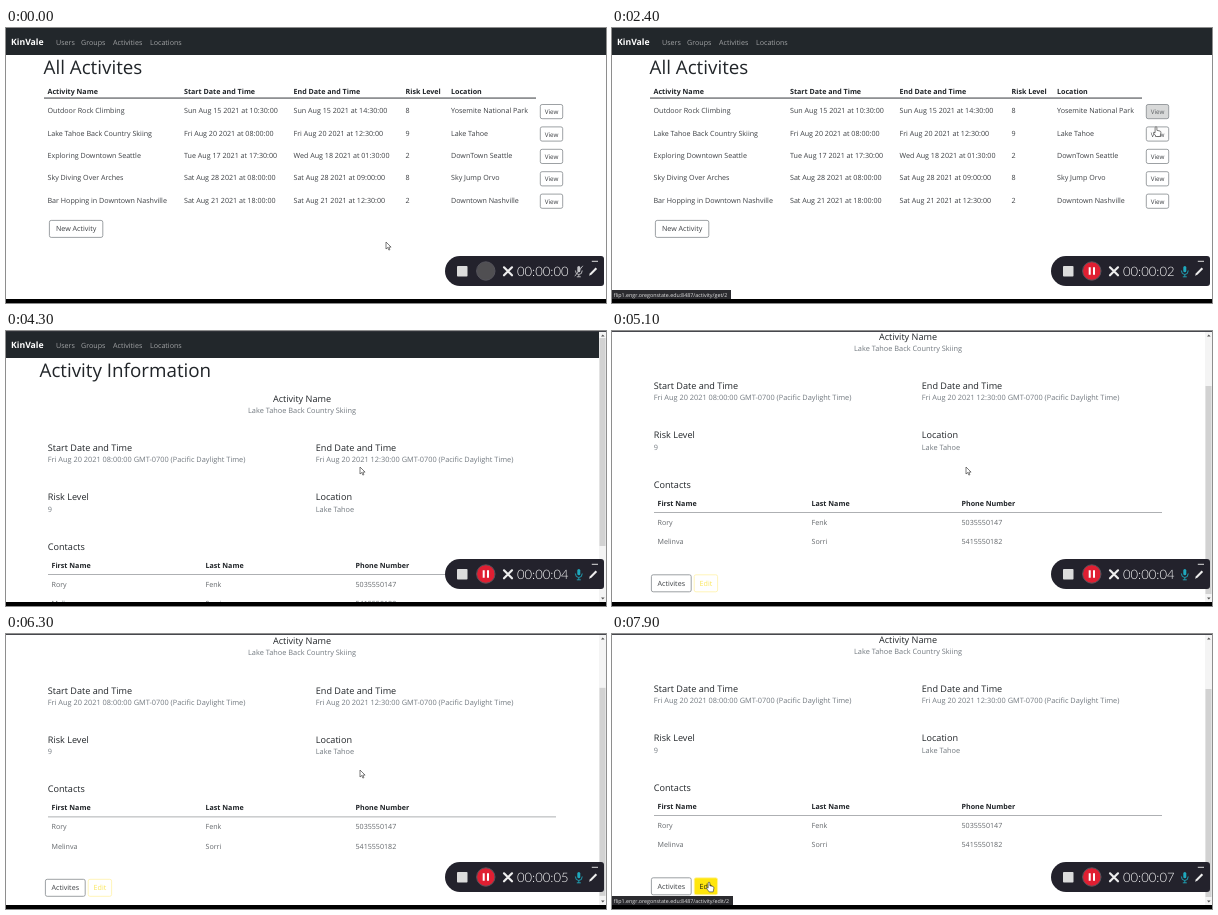
These frames come from a looping animation (600x275 px, 8 s). An HTML page:

```html
<!DOCTYPE html>
<html lang="en">
<head>
<meta charset="utf-8">
<title>Activities demo</title>
<style>
  html, body { margin: 0; width: 100%; height: 100%; overflow: hidden; background: #fff; }
  svg { display: block; width: 100vw; height: 100vh; }
  text { font: 7.13px "Open Sans", "Noto Sans", sans-serif; fill: #3c3f43; text-rendering: geometricPrecision; }
  .h1 { font-size: 18.8px; fill: #212529; }
  .brand { font-size: 8.7px; font-weight: 700; fill: #fff; }
  .nav { fill: #a0a2a4; }
  .th { font-weight: 700; fill: #212529; }
  .label { font-size: 9.1px; font-weight: 500; fill: #212529; }
  .value { font-size: 7.37px; fill: #737a80; }
  .cell { fill: #63676b; }
  .view { font-size: 6.3px; }
  .mid { text-anchor: middle; }
  .url { font-size: 5.33px; fill: #e4e4e4; }
  .clock { font: 300 13px Lato, sans-serif; fill: #fff; }
</style>
</head>
<body>
<svg id="stage" viewBox="0 0 600 275" preserveAspectRatio="none"></svg>
<script>
const LOOP = 8000, STEP = 100, MAX_SCROLL = 62;

const text = (x, y, str, cls = '', id = '') => `<text x="${x}" y="${y}" class="${cls}" id="${id}">${str}</text>`;
const rect = (x, y, w, h, attrs) => `<rect x="${x}" y="${y}" width="${w}" height="${h}" ${attrs}/>`;
const button = (x, y, w, h, label, id, cls = '', stroke = '#85898d') =>
  rect(x, y, w, h, `id="${id}Box" rx="1.8" fill="#fff" stroke="${stroke}" stroke-width=".8"`) +
  text(x + w / 2, y + h / 2 + 2.5, label, 'mid ' + cls, id + 'Label');

const navbar = rect(0, 0, 600, 27, 'fill="#22272b"') + text(5, 17, 'KinVale', 'brand') +
  [[50, 'Users'], [75, 'Groups'], [107, 'Activities'], [144, 'Locations']]
    .map(([x, s]) => text(x, 16.8, s, 'nav')).join('');

const columns = [41.5, 178, 287.5, 399.5, 445];
const activities = [
  ['Outdoor Rock Climbing', 'Sun Aug 15 2021 at 10:30:00', 'Sun Aug 15 2021 at 14:30:00', 8, 'Yosemite National Park'],
  ['Lake Tahoe Back Country Skiing', 'Fri Aug 20 2021 at 08:00:00', 'Fri Aug 20 2021 at 12:30:00', 9, 'Lake Tahoe'],
  ['Exploring Downtown Seattle', 'Tue Aug 17 2021 at 17:30:00', 'Wed Aug 18 2021 at 01:30:00', 2, 'DownTown Seattle'],
  ['Sky Diving Over Arches', 'Sat Aug 28 2021 at 08:00:00', 'Sat Aug 28 2021 at 09:00:00', 8, 'Sky Jump Orvo'],
  ['Bar Hopping in Downtown Nashville', 'Sat Aug 21 2021 at 18:00:00', 'Sat Aug 21 2021 at 12:30:00', 2, 'Downtown Nashville']
];
const row = (xs, y, cells, cls) => cells.map((s, i) => text(xs[i], y, s, cls)).join('');

const listPage = navbar + text(37.5, 46.3, 'All Activites', 'h1') +
  row(columns, 65.6, ['Activity Name', 'Start Date and Time', 'End Date and Time', 'Risk Level', 'Location'], 'th') +
  rect(38, 69.6, 492, .9, 'fill="#212529"') +
  activities.map((cells, i) => row(columns, 85.2 + 22.4 * i, cells) +
    button(534.3, 76.5 + 22.4 * i, 22.4, 14.2, 'View', 'view' + i, 'view')).join('') +
  button(43.4, 192.4, 53.4, 17, 'New Activity', 'new');

const field = (x, y, label, value, cls = '') =>
  text(x, y, label, 'label ' + cls) + text(x, y + 11.2, value, 'value ' + cls);
const contactColumns = [45.5, 199.5, 349.5];
const zone = 'GMT-0700 (Pacific Daylight Time)';

const infoPage = navbar + text(33.5, 46.3, 'Activity Information', 'h1') +
  field(296, 70.7, 'Activity Name', 'Lake Tahoe Back Country Skiing', 'mid') +
  field(41.8, 120, 'Start Date and Time', `Fri Aug 20 2021 08:00:00 ${zone}`) +
  field(309.8, 120, 'End Date and Time', `Fri Aug 20 2021 12:30:00 ${zone}`) +
  field(41.8, 169.3, 'Risk Level', '9') + field(309.8, 169.3, 'Location', 'Lake Tahoe') +
  text(41.8, 218.5, 'Contacts', 'label') +
  row(contactColumns, 236.6, ['First Name', 'Last Name', 'Phone Number'], 'th') +
  rect(42, 243, 508, .8, 'fill="#9a9da0"') +
  row(contactColumns, 255.7, ['Rory', 'Fenk', '5035550147'], 'cell') +
  row(contactColumns, 275.4, ['Melinva', 'Sorri', '5415550182'], 'cell') +
  button(39.4, 305.8, 39.8, 17, 'Activites', 'back') +
  button(82.2, 305.8, 23.4, 17, 'Edit', 'edit', '', '#fff2a8');

const scrollbar = rect(593, 0, 7, 271, 'fill="#f4f4f4"') +
  rect(593.5, 7, 6, 208, 'id="thumb" fill="#d2d2d2"') +
  '<path d="M595 5.5l1.8-2 1.8 2zM595 266.5l1.8 2 1.8-2z" fill="#555"/>';

const recorder = '<path d="M454 228H595q3 0 3 3V255q0 3-3 3H454a15 15 0 0 1 0-30z" fill="#23222c"/>' +
  rect(451, 238, 10.5, 10.5, 'rx=".8" fill="#dcdcdc"') +
  '<circle id="recDot" cx="479.8" cy="243" r="9.2" stroke="#55545c" stroke-width="1"/>' +
  '<path id="pause" d="M477.7 239.2v7.6M482 239.2v7.6" stroke="#fff" stroke-width="2"/>' +
  '<path d="M498 239.3l8 8M506 239.3l-8 8" stroke="#eee" stroke-width="2.2" stroke-linecap="round"/>' +
  text(511, 247.8, '', 'clock', 'clock') +
  '<g id="mic" fill="none" stroke-width=".9"><path d="M572.8 239.4v3.4" stroke-width="3" stroke-linecap="round"/>' +
  '<path d="M569.4 242.5q0 4 3.4 4t3.4-4M572.8 246.5v2.3M570.8 248.8h4"/><path id="slash" d="M568.8 248.2l8-10.4"/></g>' +
  '<path d="M585.8 233.3h6.2" stroke="#ddd"/><path d="M583 247.7l1-2.4 5.6-5.8 1.5 1.5-5.7 5.7z" fill="#eee"/>';

const outline = 'fill="#fff" stroke="#444" stroke-width=".7" stroke-linejoin="round"';
document.getElementById('stage').innerHTML = rect(0, 0, 600, 275, 'fill="#fff"') +
  `<g id="list">${listPage}</g><g id="info"><g id="content">${infoPage}</g>${scrollbar}` +
  `${rect(0, 0, 600, .9, 'fill="#33343a"')}</g>` +
  `<g id="status">${rect(0, 262, 119, 9.3, 'id="statusBox" fill="#2b2b2f"')}${text(1.8, 268.6, '', 'url', 'url')}</g>` +
  rect(0, 271, 600, 4, 'fill="#000"') + recorder +
  `<g id="cursor"><path id="arrow" d="M0 0v7l1.7-1.5 1.2 2.6 1-.5-1.1-2.5h2.3z" ${outline}/>` +
  `<path id="hand" d="M-.9.7q.9-1.4 1.8 0v3l3.2.8q1 .4.8 1.6l-.7 3.8H.2l-2.8-3.6q.1-1.4 1.7-.2z" ${outline}/></g>`;

const el = id => document.getElementById(id);
const set = (id, name, value) => el(id).setAttribute(name, value);
const show = (id, on) => set(id, 'visibility', on ? 'visible' : 'hidden');
const within = (t, a, b) => t >= a && t < b;
const clamp = v => Math.max(0, Math.min(1, v));
const smooth = u => u * u * (3 - 2 * u);

// Keys are [time, ...values], eased between neighbours.
function track(t, keys) {
  const next = keys.findIndex(k => k[0] > t);
  if (next < 0) return keys.at(-1).slice(1);
  const a = keys[next - 1], b = keys[next], u = smooth((t - a[0]) / (b[0] - a[0]));
  return a.slice(1).map((v, i) => v + (b[i + 1] - v) * u);
}

const pointer = [[0, 380, 214], [200, 380, 214], [1200, 545, 83], [2150, 545, 83], [2400, 544, 98.6],
  [2600, 545, 105], [3500, 545, 105], [4200, 354, 136], [6600, 354, 136], [7500, 97, 248]];
const scrolling = [[0, 0], [4400, 0], [4700, MAX_SCROLL], [5500, MAX_SCROLL], [5600, 24], [5700, 0],
  [6000, 0], [6300, 60.5], [6400, MAX_SCROLL]];

const hover = (t, from, to) => clamp((t - from) / 150) - clamp((t - to) / 150);
const blend = (a, b, u) => `rgb(${a.map((v, i) => v + (b[i] - v) * smooth(u))})`;
const white = [255, 255, 255], ink = [60, 63, 67], dark = [33, 37, 41];
function paintButton(id, amount, fill, label, hoverLabel) {
  set(id + 'Box', 'fill', blend(white, fill, amount));
  el(id + 'Label').style.fill = blend(label, hoverLabel, amount);
}

function draw(t) {
  show('list', t < 3100);
  show('info', t >= 3100);
  const [x, y] = track(t, pointer), [scroll] = track(t, scrolling);
  set('cursor', 'transform', `translate(${x} ${y})`);
  set('content', 'transform', `translate(0 ${-scroll})`);
  set('thumb', 'y', 7 + scroll * .774);

  const overFirst = within(t, 1050, 2290), overSecond = within(t, 2390, 3100), overEdit = t >= 7450;
  const pointing = overFirst || overSecond || overEdit;
  show('hand', pointing);
  show('arrow', !pointing);
  paintButton('view0', hover(t, 1050, 2290), dark, ink, white);
  paintButton('view1', hover(t, 2390, LOOP), dark, ink, white);
  paintButton('edit', hover(t, 7450, LOOP), [255, 230, 12], [250, 230, 90], [30, 30, 20]);

  const editing = t >= 7600;
  show('status', within(t, 1100, 3600) || editing);
  set('statusBox', 'width', editing ? 121 : 119);
  el('url').textContent = 'flip1.engr.oregonstate.edu:8487/activity/' +
    (editing ? 'edit/2' : t < 2390 ? 'get/1' : 'get/2');

  const recording = t >= 200;
  set('recDot', 'fill', recording ? '#e01f32' : '#504f52');
  set('mic', 'stroke', recording ? '#1fa9bd' : '#c4c4c8');
  show('pause', recording);
  show('slash', !recording);
  el('clock').textContent = '00:00:0' + Math.max(0, Math.floor((t - 170) / 1030));
}

const start = performance.now();
function tick() {
  draw(Math.floor((performance.now() - start) % LOOP / STEP) * STEP);
  requestAnimationFrame(tick);
}
tick();
</script>
</body>
</html>
```
